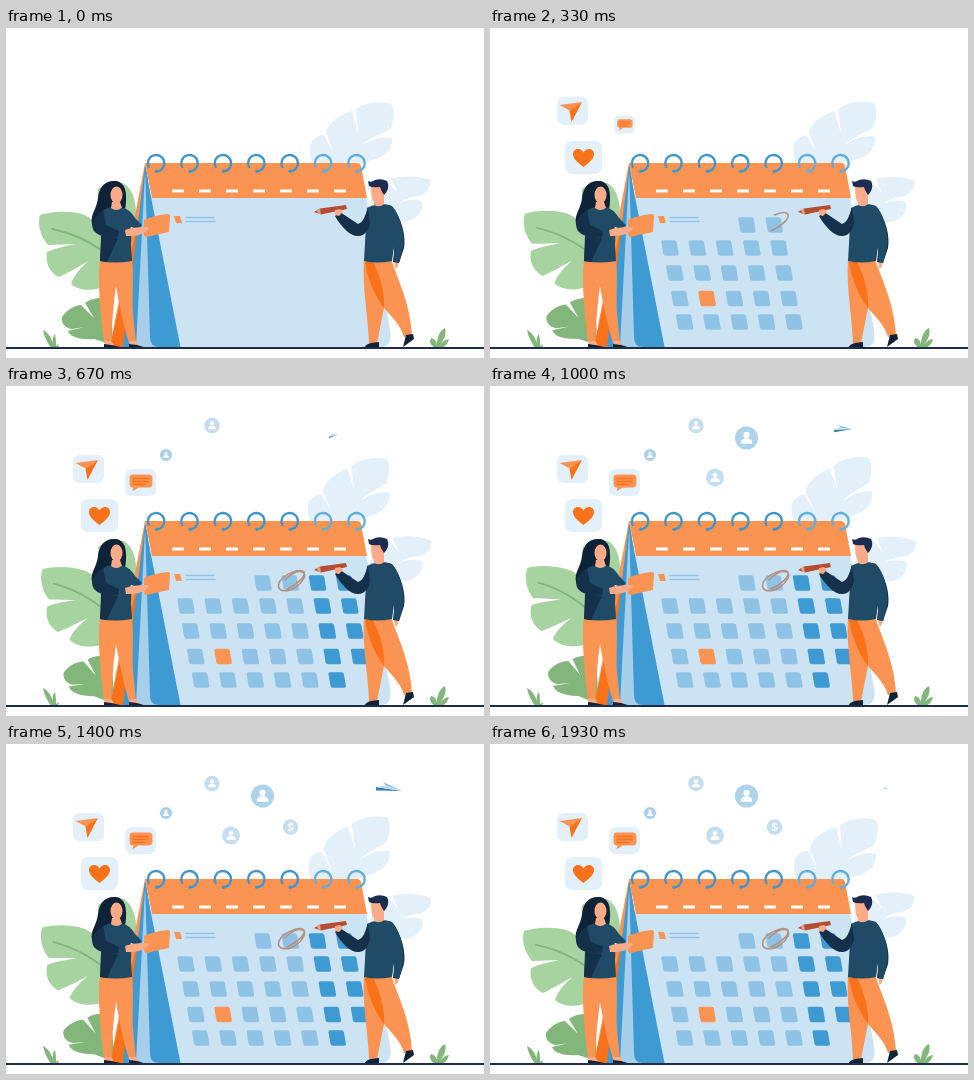
These frames come from a looping animation (478x330 px, 1.99 s). An HTML page:

```html
<!DOCTYPE html>
<html lang="en">
<head>
<meta charset="utf-8">
<title>Calendar planning</title>
<style>
  html, body { margin: 0; width: 100%; height: 100%; overflow: hidden; background: #fff; }
  svg { display: block; width: 478px; height: 330px; }
  .pale { fill: #e3f0f9; }
  .green { fill: #a7d3a0; }
  .moss { fill: #82b67b; }
  .orange { fill: #fb9352; }
  .deep { fill: #f97119; }
  .blue { fill: #3d9ad3; }
  .navy { fill: #1f4b66; }
  .dark { fill: #14304a; }
  .hair { fill: #0e2337; }
  .skin { fill: #fbab87; }
  .line { fill: none; stroke-linecap: round; stroke-linejoin: round; }
</style>
</head>
<body>
<svg viewBox="0 0 478 330" xmlns="http://www.w3.org/2000/svg">
  <!-- foliage -->
  <g data-sway="-5.5 335 150">
    <path class="pale" d="M316 150C306 140 302 126 305 115C309 109 315 106 318 107L327 124L320 104C324 92 335 87 346 83L352 106L350 81C358 75 374 73 385 76C389 79 389 90 384 101C375 106 365 109 356 117C366 111 376 108 386 110C387 118 382 127 370 131C355 135 340 140 330 150Z"/>
  </g>
  <g data-sway="3.2 362 187">
    <path class="pale" d="M365 192C360 172 372 156 380 152L392 165L385 151C397 147 415 148 424 152C425 160 420 166 412 168C404 169 398 171 394 175C402 171 410 171 416 174C418 182 412 190 403 193C390 195 376 192 365 192Z"/>
  </g>
  <g data-sway="1.5 115 195">
    <path class="green" d="M100 190C92 178 91 166 92 161C98 157 107 156 117 155C126 160 131 172 130 195Z"/>
  </g>
  <g data-sway="4.6 102 228">
    <path class="green" d="M104 232C101 208 91 191 76 186C61 182 44 184 34 187C31 197 35 209 42 217C51 217 60 216 70 216C60 218 50 220 41 224C39 234 43 244 53 249C63 244 71 240 82 233C73 242 68 247 65 256C73 263 88 264 102 257Z"/>
    <path class="line" d="M46 201C66 205 84 213 102 227" stroke="#82b67b" stroke-width="1.8"/>
  </g>
  <g data-sway="5 100 315">
    <path class="moss" d="M106 316C108 296 104 280 97 270C90 270 82 272 79 275L88 290L75 277C67 278 61 282 56 289C55 295 59 300 66 301L79 299L62 303C64 309 74 312 88 311L104 316Z"/>
  </g>
  <path class="moss" d="M45 320C41 314 38 308 37 302C43 305 46 311 47 316C46 312 47 308 49 306C50 311 50 315 50 318L53 316L52 320ZM429 320C424 317 423 313 425 310C429 311 431 314 431 317C431 309 434 302 439 300C441 307 437 313 434 317C437 313 440 311 443 311C442 315 440 318 436 320Z"/>

  <!-- calendar -->
  <path class="orange" d="M139 135L104 319H122L142 150Z"/>
  <path class="deep" d="M134 185L104 319H119L138 185Z"/>
  <path class="blue" d="M139 137L117 319H134L144 165Z"/>
  <path d="M139 145L130 319H150L146 175Z" fill="#a8cfe9"/>
  <path d="M144 168H360L384 302Q387 319 375 319H170Z" fill="#cce3f4"/>
  <path class="blue" d="M139 137L145 169L174.5 319H153Q144 319 144 309Z"/>
  <path class="orange" d="M139 135H351Q354 135 355 138L361 170H146Z"/>
  <path d="M166 163h12m15 0h12m15 0h12m15 0h12m15 0h12m15 0h12m15 0h12" stroke="#fff" stroke-width="3"/>
  <g id="rings" class="line" stroke-width="2.3"></g>
  <path class="orange" d="M168 188h6l2 7h-6z"/>
  <path class="line" d="M180 189.5h28m-28 4h29" stroke="#91c3e5" stroke-width="1.5"/>
  <g id="cells"></g>
  <path id="scribble" class="line" pathLength="1" stroke-dasharray="1 2" stroke="#b49180" stroke-width="1.6"
    d="M281 203C290 199 300 191 298 186C294 182 277 188 273 197C270 206 281 207 290 201C297 196 301 189 297 186C292 184 284 188 279 194"/>

  <!-- woman -->
  <path class="hair" d="M108 153C98 153 93 160 92 170C91 181 84 186 86 196C89 205 98 209 108 206L119 182C121 172 122 153 108 153Z"/>
  <path class="orange" d="M94 231H126C128 252 126 268 127 285L130 315H123C118 299 114 281 110 258C107 280 106 297 105 315H98C95 290 91 255 94 231Z"/>
  <path class="skin" d="M98 313h7l3 4h-9zM123 313h7l3 4h-9z"/>
  <path class="hair" d="M98 320V316L105 317L119 320ZM123 320V316L131 317L141 320Z"/>
  <path class="navy" d="M99 181C106 178 116 178 120 181C125 188 126 209 125 217L126 233Q109 236 94 233L96 208C92 198 92 187 99 181Z"/>
  <path class="dark" d="M95 208L112 210L101 234L94 233Z"/>
  <path class="dark" d="M97 182C89 187 83 195 88 203C93 209 103 210 112 209L113 203L100 197Z"/>
  <path class="skin" d="M106 174H114L116 180Q110 184 105 180Z"/>
  <ellipse class="skin" cx="110.5" cy="167" rx="6" ry="8.5"/>
  <path class="hair" d="M104 176C101 167 104 158 111 158C116 158 118 163 117 172C122 165 119 153 108 153C97 155 97 170 100 181Z"/>
  <path class="orange" d="M138 192Q149 187 162 186Q164 186 164 188L163 204Q152 206 141 209Q138 209 138 206Z"/>
  <path class="navy" d="M114 181C121 179 125 184 129 190L136 197L132 201L118 197Z"/>
  <path class="skin" d="M119 202C127 199 135 199 142 199L143 201L138 205C132 208 126 208 120 208Z"/>

  <!-- man -->
  <path class="orange" d="M358 231H385C391 250 404 274 406 307L398 309C395 298 387 290 378 280L371 315H363C362 287 356 259 358 231Z"/>
  <path class="deep" d="M359 234C362 252 369 268 378 280C379 268 375 249 367 234Z"/>
  <path class="hair" d="M358 320Q360 316 365 315L373 314V320ZM397 319L400 307L407 306L408 311Z"/>
  <path class="skin" d="M387 230h7l-2 8q-3 5-3 0z"/>
  <path class="dark" d="M386 179C396 190 400 209 398 220L393 235L387 234L389 214Z"/>
  <path class="navy" d="M361 180C367 176 380 175 386 178C394 186 399 207 397 219L393 235L388 233L388 219L386 233Q371 236 358 233Z"/>
  <path class="dark" d="M362 180C359 187 358 194 352 196L334 184L329 188C336 200 345 209 353 208C360 207 363 201 364 195Z"/>
  <path class="skin" d="M368 169H378V176Q374 180 368 177Z"/>
  <path class="skin" d="M365 158L378 157L378 169Q374 176 368 174Q365 172 365 158Z"/>
  <path d="M362 153Q365 155 369 152Q375 150 381 153C384 159 381 164 378 167L375 162L374 159Q366 160 363 158Z" fill="#1c2c50"/>
  <path d="M308 184L314 180.500L340 177L341 181L315 186.500Z" fill="#b64c32"/>
  <path d="M311 182.300L314 180.500L315 186.500L312 185.500Z" fill="#e0a183"/>
  <path class="skin" d="M329 182L334 181L337 184L333 188L329 187Z"/>

  <path d="M0 320H478" stroke="#1e2d49" stroke-width="2"/>

  <!-- floating icons -->
  <g data-pop="-.2 2 93.5 129.5">
    <rect class="pale" x="-18.5" y="-16.5" width="37" height="33" rx="7"/>
    <path class="deep" d="M0 9.5C-6 5-10.5 1-10.5-3.5C-10.5-9-3-10.5 0-5C3-10.5 10.5-9 10.5-3.5C10.5 1 6 5 0 9.5Z"/>
  </g>
  <g data-pop="1 3 82.5 83">
    <rect class="pale" x="-15.5" y="-14" width="31" height="28" rx="7"/>
    <path class="orange" d="M-13-6L9.5-9L-2 0Z"/>
    <path class="deep" d="M9.5-9L-1 11L-3 0Z"/>
  </g>
  <g data-pop="3 6 134.5 96.5">
    <rect class="pale" x="-15.5" y="-13.5" width="31" height="27" rx="7"/>
    <path class="orange" d="M-8-8H8Q12-8 12-4V1Q12 5 8 5H-2L-8 9L-7 5H-8Q-11 5-11 1V-4Q-11-8-8-8Z"/>
    <path d="M-8-4H8M-8-1H8M-8 2H5" stroke="#f97119" stroke-width="1.4"/>
  </g>
  <g id="users"></g>
  <g data-pop="16 19 284.5 83">
    <circle r="7.7" fill="#c5deef"/>
    <text y="4" text-anchor="middle" font-family="Inter, Arial, sans-serif" font-weight="600" font-size="11" fill="#fff">$</text>
  </g>
  <g id="plane">
    <path d="M-6-5L13 4L-3-1Z" fill="#8fc3e6"/>
    <path d="M-13 0L13 4L-13 3.5Z" fill="#3982b5"/>
    <path d="M-13 0L-5-1L13 4Z" fill="#b8d9ee"/>
  </g>
</svg>
<script>
const LOOP = 1990, STEPS = 30;
const $ = id => document.getElementById(id);

function add(parent, tag, attrs) {
  const node = document.createElementNS("http://www.w3.org/2000/svg", tag);
  for (const key in attrs) node.setAttribute(key, attrs[key]);
  return parent.appendChild(node);
}

for (let i = 0; i < 7; i++) {
  const x = 150 + i * 33.4;
  const color = i > 4 ? "#60aede" : "#3f96cb";
  add($("rings"), "path", { d: `M${x - 7.2} 139A8.2 8.2 0 1 1 ${x + 0.6} 143.4`, stroke: color });
  add($("rings"), "circle", { cx: x + 0.5, cy: 143.3, r: 1.2, fill: color, stroke: color, "stroke-width": 1 });
}

const rowY = [197, 220, 245, 270.5, 294];
const cells = [];
rowY.forEach((y, row) => {
  for (let col = row ? 0 : 3; col < (row < 4 ? 7 : 6); col++) {
    const fill = row === 3 && col === 1 ? "#fb9352" : col > 4 ? "#3d9ad3" : "#8fc3e5";
    const node = add($("cells"), "rect", {
      x: -7.7, y: -7.7, width: 15.4, height: 15.4, rx: 2, fill,
      transform: `translate(${180 + 27.3 * col + 4.9 * (row - 1)} ${y}) skewX(10)`
    });
    cells.push({ node, col });
  }
});

function addUser(x, y, r, fill, start, end) {
  const g = add($("users"), "g", { "data-pop": `${start} ${end} ${x} ${y}` });
  add(g, "circle", { r, fill });
  add(g, "circle", { cy: -r * 0.27, r: r * 0.27, fill: "#fff" });
  add(g, "path", {
    d: "M-.5 .5C-.5 .1-.25 .03 0 .03S.5 .1 .5 .5Z", fill: "#fff", transform: `scale(${r})`
  });
}
addUser(160, 69, 6, "#a9d0ea", 5.5, 9);
addUser(206, 39.5, 7.7, "#c5deef", 8.4, 10);
addUser(225, 91.5, 9, "#c5deef", 10, 13);
addUser(256.5, 52, 11.5, "#aed3ea", 11, 14);

const readParts = name => [...document.querySelectorAll(`[data-${name}]`)]
  .map(node => ({ node, v: node.dataset[name].split(" ").map(Number) }));
const pops = readParts("pop");
const sways = readParts("sway");

// step, x, y, angle, scale
const flight = [
  [6, 312, 60, -38, 0],
  [7, 316, 56, -34, 0.1],
  [10, 327, 49, -24, 0.35],
  [15, 353, 42, -11, 0.72],
  [21, 383, 43, 0, 1],
  [29, 396, 44, 5, 0.16]
];

const clamp = n => Math.max(0, Math.min(1, n));

function drawPlane(step) {
  const i = flight.findIndex(key => key[0] >= step);
  const to = flight[Math.max(i, 0)];
  const from = flight[Math.max(i - 1, 0)];
  const p = clamp((step - from[0]) / (to[0] - from[0] || 1));
  const [, x, y, angle, size] = from.map((n, k) => n + (to[k] - n) * p);
  $("plane").setAttribute("transform", `translate(${x} ${y}) rotate(${angle}) scale(${size})`);
}

function draw(step) {
  const bend = (1 - Math.cos(2 * Math.PI * step / STEPS)) / 2;
  for (const { node, v: [angle, x, y] } of sways)
    node.setAttribute("transform", `rotate(${angle * bend} ${x} ${y})`);
  for (const { node, v: [start, end, x, y] } of pops) {
    const size = step ? clamp((step - start) / (end - start)) : 0;
    node.setAttribute("transform", `translate(${x} ${y}) scale(${size})`);
  }
  for (const { node, col } of cells)
    node.setAttribute("visibility", step > col ? "visible" : "hidden");
  const drawn = clamp((step - 4) / 3);
  $("scribble").setAttribute("stroke-dashoffset", 1 - drawn);
  $("scribble").setAttribute("visibility", drawn ? "visible" : "hidden");
  drawPlane(step);
}

const began = performance.now();
function tick() {
  const t = (performance.now() - began) % LOOP;
  draw(Math.min(STEPS - 1, Math.floor(t * STEPS / LOOP + 0.03)));
  requestAnimationFrame(tick);
}
tick();
</script>
</body>
</html>
```
